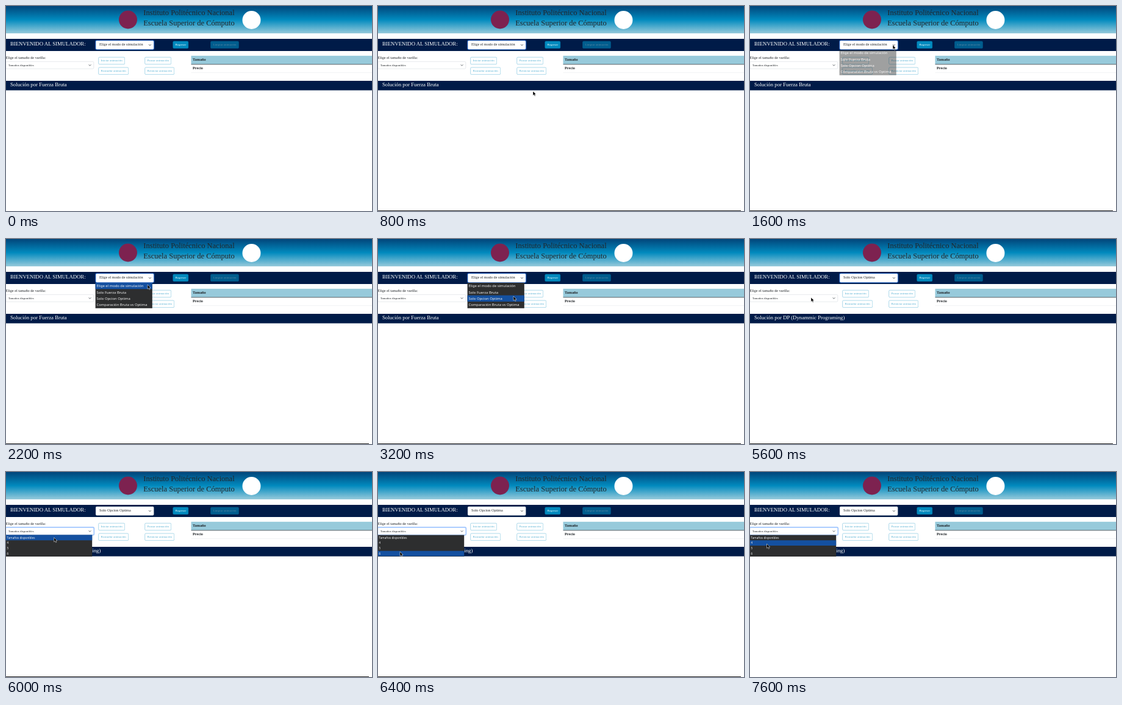
Animation of 600 by 337 pixels, one loop 8000 ms. Source, as an HTML page:

```html
<!DOCTYPE html>
<html lang="es">
<head>
<meta charset="utf-8">
<title>Simulador</title>
<style>
  html, body { margin: 0; width: 100%; height: 100%; overflow: hidden; background: #fff; }
  svg { display: block; width: 600px; height: 337px; }
  text { font-family: "Liberation Serif", "Times New Roman", serif; white-space: pre; }
  .menu text { font-family: "Noto Sans", sans-serif; }
</style>
</head>
<body>
<svg id="stage" viewBox="0 0 600 337">
  <defs>
    <linearGradient id="sky" x1="0" y1="0" x2="0" y2="1">
      <stop offset="0" stop-color="#02457a"/>
      <stop offset=".5" stop-color="#018abe"/>
      <stop offset="1" stop-color="#97cadb"/>
    </linearGradient>
  </defs>
</svg>
<script>
const NAVY = '#001b48', BLUE = '#018abe', PALE = '#97cadb', INK = '#212529';
const LOOP = 8000, TICK = 200;
const stage = document.getElementById('stage');

function add(tag, attrs, parent = stage) {
  const el = document.createElementNS('http://www.w3.org/2000/svg', tag);
  for (const key in attrs) el.setAttribute(key, attrs[key]);
  parent.appendChild(el);
  return el;
}
const rect = (x, y, width, height, fill, more = {}, parent = stage) =>
  add('rect', { x, y, width, height, fill, ...more }, parent);
function label(str, x, y, size, fill, more = {}, parent = stage) {
  const el = add('text', { x, y, 'font-size': size, fill, ...more }, parent);
  el.textContent = str;
  return el;
}
const chevron = (x, y) => add('path', {
  d: `M${x - 1.6} ${y - .8}l1.6 1.6l1.6 -1.6`, fill: 'none', stroke: '#343a40',
  'stroke-width': .8, 'stroke-linecap': 'round', 'stroke-linejoin': 'round'
});
function button(str, x, y, w, fill, stroke, ink, opacity = 1) {
  const g = add('g', { opacity });
  rect(x, y, w, 11.6, fill, { rx: 1.6, stroke, 'stroke-width': .5 }, g);
  label(str, x + w / 2, y + 7.2, 5, ink, { 'text-anchor': 'middle' }, g);
}
function select(x, y, w, h) {
  const ring = rect(x - .6, y - .6, w + 1.2, h + 1.2, 'none',
    { rx: 2, stroke: '#0d6efd', 'stroke-opacity': .4, 'stroke-width': 1.4 });
  const box = rect(x, y, w, h, '#fff', { rx: 1.6, 'stroke-width': .5 });
  chevron(x + w - 6.3, y + h / 2 + .1);
  return focused => {
    ring.setAttribute('visibility', focused ? 'visible' : 'hidden');
    box.setAttribute('stroke', focused ? '#86b7fe' : '#ced4da');
  };
}
function menu(items, x, y, w, row, size, inset) {
  const g = add('g', { class: 'menu' });
  rect(x, y, w, row * items.length + .6, '#2d2e2f', {}, g);
  const bar = rect(x, y, w, row, '#1450a0', {}, g);
  items.forEach((str, i) =>
    label(str, x + inset, y + row * (i + .5) + size * .36, size, '#f2f2f2', {}, g));
  return (opacity, hover) => {
    g.setAttribute('opacity', opacity);
    bar.setAttribute('y', y + row * Math.max(hover, 0));
    bar.setAttribute('visibility', hover < 0 ? 'hidden' : 'visible');
  };
}

// Header
rect(0, 0, 600, 45, 'url(#sky)');
add('circle', { cx: 200, cy: 22.5, r: 15, fill: '#7d2250' });
add('circle', { cx: 402.5, cy: 23, r: 15, fill: '#fff' });
label('Instituto Politécnico Nacional', 300, 14.7, 12.5, INK, { 'text-anchor': 'middle' });
label('Escuela Superior de Cómputo', 300, 32.1, 12.5, INK, { 'text-anchor': 'middle' });

// Toolbar
rect(0, 54, 600, 20, NAVY);
label('BIENVENIDO AL SIMULADOR:', 7, 64.6, 8.75, '#fff');
const focusMode = select(147.2, 57, 95, 14.2);
const mode = label('', 153, 65.4, 6.25, INK);
button('Regresar', 273.8, 58, 25, BLUE, BLUE, '#fff');
button('Limpiar animación', 335.5, 58, 46, BLUE, BLUE, PALE, .6);

// Controls
label('Elige el tamaño de varilla:', -.6, 86.7, 6.25, INK);
const focusSize = select(-.2, 91.4, 144, 11.8);
label('Tamaños disponibles', 3.7, 98.5, 5, INK);
[['Iniciar', 151.7, 84.2, 43], ['Pausar', 227.7, 84.2, 43],
 ['Reanudar', 151.7, 101, 49], ['Reiniciar', 227.7, 101, 48]].forEach(([verb, x, y, w]) =>
  button(verb + ' animación', x, y, w, '#fff', BLUE, BLUE, .65));

// Price table
rect(303.5, 81.8, 296.5, 14, PALE);
rect(303.5, 95.6, 296.5, .7, INK);
rect(303.5, 109.5, 296.5, .4, '#dee2e6');
label('Tamaño', 306, 89.6, 6.25, INK, { 'font-weight': 700 });
label('Precio', 306, 104.3, 6.25, INK, { 'font-weight': 700 });

// Solution heading
rect(0, 123, 600, 15.6, NAVY);
const heading = label('', 7, 132.4, 8.75, '#fff');

const showModes = menu(['Elige el modo de simulación', 'Solo Fuerza Bruta', 'Solo Opcion Optima',
  'Comparación Bruta vs Optima'], 146.6, 72, 93.2, 10.3, 5.87, 2);
const showSizes = menu(['Tamaños disponibles', '4', '5', '6'], 0, 103.6, 141.2, 8.7, 4.67, 1.5);

const edge = rect(0, 336, 595, 1, '#2a2a2a');
const cursor = add('path', {
  d: 'M0 0V7.2L1.7 5.7L2.9 8.3L4.1 7.8L3 5.2H5.2Z', fill: '#000',
  stroke: '#fff', 'stroke-width': .5, 'stroke-linejoin': 'round'
});

// [time, x, y]
const PATH = [[200, 300, 337], [800, 254, 140], [1200, 234, 64], [2000, 234, 64], [2400, 230, 86],
  [2800, 222, 94], [5000, 222, 94], [5400, 100, 96], [5800, 100, 96],
  [6400, 36, 131], [6800, 34, 130], [7200, 27.5, 118], [8000, 27.5, 118]];
// [start time, opacity, highlighted row]
const MODES = [[0, 0, -1], [1600, .45, -1], [1800, 1, 0], [2400, 1, 1], [2800, 1, 2], [3400, .5, 2], [3600, 0, -1]];
const SIZES = [[0, 0, -1], [6000, 1, 0], [6200, 1, 2], [6400, 1, 3], [7000, 1, 2], [7200, 1, 1]];

const at = (table, t) => table.filter(s => s[0] <= t).pop();
function place(t) {
  const i = PATH.findIndex(p => p[0] > t);
  const [t0, x0, y0] = PATH[i - 1], [t1, x1, y1] = PATH[i];
  const k = (t - t0) / (t1 - t0);
  return `translate(${x0 + (x1 - x0) * k} ${y0 + (y1 - y0) * k})`;
}
const show = (el, on) => el.setAttribute('visibility', on ? 'visible' : 'hidden');

function draw(t) {
  const chosen = t >= 3600, sizing = t >= 6000;
  mode.textContent = chosen ? 'Solo Opcion Optima' : 'Elige el modo de simulación';
  heading.textContent = 'Solución por ' + (chosen ? 'DP (Dynammic Programing)' : 'Fuerza Bruta');
  focusMode(!sizing);
  focusSize(sizing);
  showModes(...at(MODES, t).slice(1));
  showSizes(...at(SIZES, t).slice(1));
  show(edge, (t >= 400 && t < 3600) || (t >= 5200 && t < 7200));
  show(cursor, t >= 200);
  if (t >= 200) cursor.setAttribute('transform', place(t));
}

const start = performance.now();
function loop() {
  const t = (performance.now() - start) % LOOP;
  draw(Math.floor(t / TICK) * TICK);
  requestAnimationFrame(loop);
}
loop();
</script>
</body>
</html>
```
